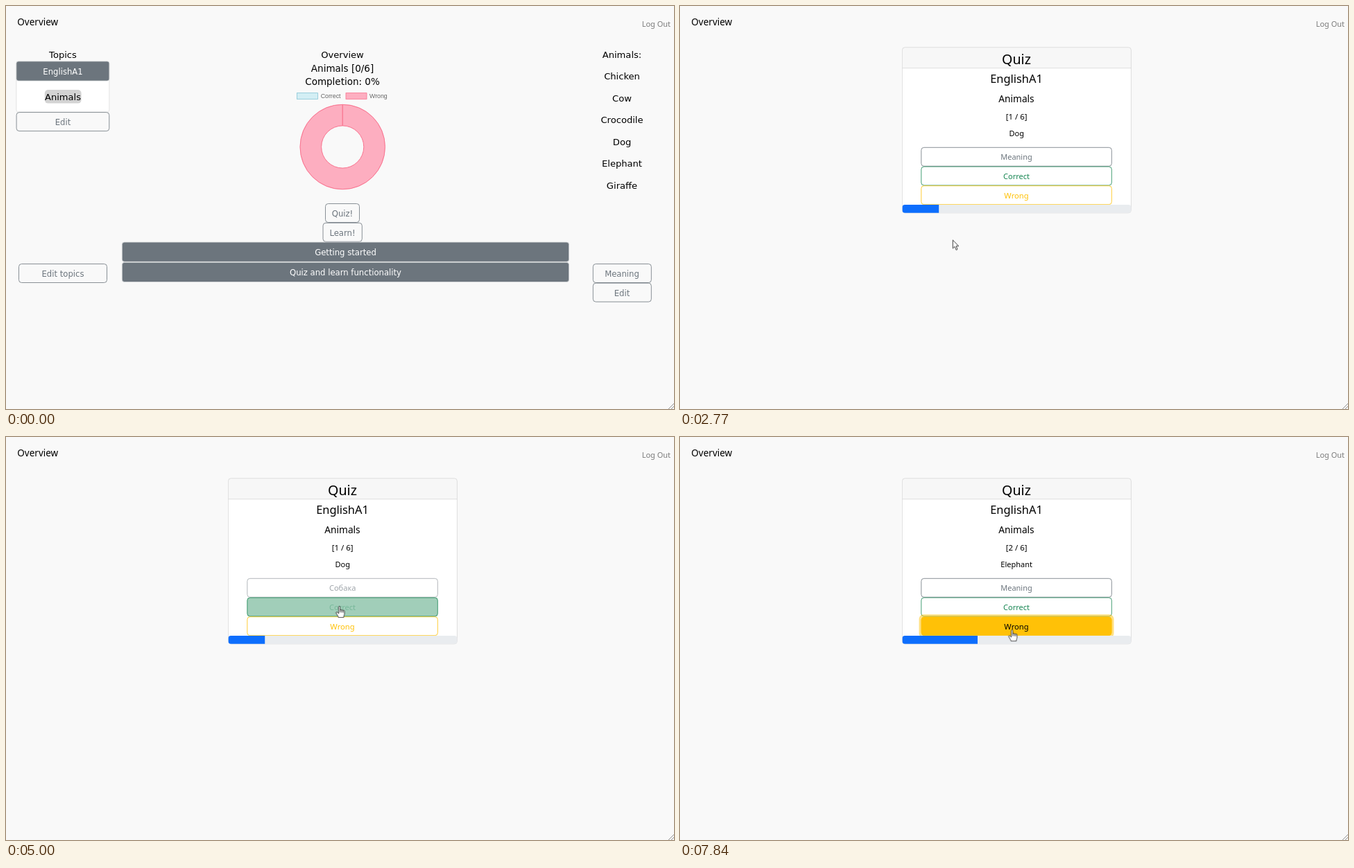
Recreate the animation shown at these times as an HTML page. Size 963x582 px, loop 8 s.

```html
<!DOCTYPE html>
<html lang="en">
<head>
<meta charset="utf-8">
<title>Vocabulary quiz</title>
<style>
@property --h { syntax: "<number>"; inherits: true; initial-value: 0; }
@property --r { syntax: "<number>"; inherits: true; initial-value: 0; }

html, body { margin: 0; width: 100%; height: 100%; overflow: hidden; background: #f9f9f9; }
svg { display: block; width: 100vw; height: 100vh; }
text { text-anchor: middle; font: 11px "Noto Sans", sans-serif; }
.left { text-anchor: start; }
#home text { font: 13.1px "DejaVu Sans", sans-serif; }
#home .wide { font-size: 13.5px; }
#home .legend { font: 8.8px "Liberation Sans", Arial, sans-serif; fill: #666; }
#home .btn text, #home .bar text { font-size: 11.65px; }

/* --h: hover amount, --r: focus ring amount */
.btn { --c: #6c757d; --on: #fff; }
.ok { --c: #198754; }
.warn { --c: #ffc107; --on: #000; }
.btn rect { fill: var(--c); fill-opacity: var(--h); stroke: var(--c); stroke-width: .8; }
.btn .ring { fill: none; stroke-width: 2.9; stroke-opacity: calc(var(--r) * .5); }
.btn text { fill: color-mix(in srgb, var(--on) calc(var(--h) * 100%), var(--c)); }
.bar rect { fill: #6c757d; stroke: #d3d6d8; stroke-width: .8; }
.bar text { fill: #fff; }

#home, #quiz, .first, .second, .ask, .answer, #arrow, #hand { animation: 8s step-end infinite; }
#home, .first, .ask { opacity: 1; }
#home { animation-name: home; }
#quiz { animation-name: quiz; }
.first { animation-name: first; }
.second { animation-name: second; }
.ask { animation-name: ask; }
.answer { animation-name: answer; }
#arrow { animation-name: arrow; }
#hand { animation-name: hand; }
#start { animation: start 8s ease-in-out infinite; }
#bar1 { animation: bar1 8s ease-in-out infinite; }
#bar2 { animation: bar2 8s ease-in-out infinite; }
#meaning { animation: meaning 8s ease-in-out infinite; }
#correct { animation: correct 8s ease-in-out infinite; }
#wrong { animation: wrong 8s ease-in-out infinite; }
#progress { animation: progress 8s ease infinite; }
#cursor { animation: move 8s linear infinite; }

@keyframes home { 0% { opacity: 1 } 23.75%, 100% { opacity: 0 } }
@keyframes quiz { 0% { opacity: 0 } 23.75%, 100% { opacity: 1 } }
@keyframes first { 0% { opacity: 1 } 71.375%, 100% { opacity: 0 } }
@keyframes second { 0% { opacity: 0 } 71.375%, 100% { opacity: 1 } }
@keyframes ask { 0% { opacity: 1 } 51.75% { opacity: 0 } 71.375%, 100% { opacity: 1 } }
@keyframes answer { 0% { opacity: 0 } 51.75% { opacity: 1 } 71.375%, 100% { opacity: 0 } }

@keyframes start {
  0%, 8.375% { --h: 0 } 10.25%, 100% { --h: 1 }
  0%, 14.75% { --r: 0 } 17.1%, 100% { --r: 1 }
}
@keyframes bar2 { 0%, 4.75%, 7.375%, 100% { fill: #6c757d } 5.5% { fill: #666e75 } }
@keyframes bar1 { 0%, 5.5%, 8.25%, 100% { fill: #6c757d } 6.375% { fill: #646c73 } }
@keyframes meaning {
  0%, 39.72% { --h: 0 } 41.6%, 51.74% { --h: 1 } 51.75%, 100% { --h: 0 }
  0%, 45% { --r: 0 } 46.9%, 51.74% { --r: 1 } 51.75%, 100% { --r: 0 }
  0%, 51.74% { opacity: 1 } 51.75%, 71.37% { opacity: .65 } 71.375%, 100% { opacity: 1 }
}
@keyframes correct {
  0%, 37.75% { --h: 0 } 39.72% { --h: 1 } 41.6%, 61.675% { --h: 0 }
  63.55%, 93.5% { --h: 1 } 95.375%, 100% { --h: 0 }
  0%, 64.625% { --r: 0 } 66.5%, 71.375% { --r: 1 } 73.25%, 100% { --r: 0 }
}
@keyframes wrong {
  0%, 36.5% { --h: 0 } 37.75% { --h: .7 } 39.4%, 93.5% { --h: 0 } 95.375%, 100% { --h: 1 }
  0%, 96.125% { --r: 0 } 97.94%, 100% { --r: 1 }
}
@keyframes progress { 0%, 71.375% { width: 52.8px } 74.375%, 100% { width: 108.6px } }

@keyframes move {
  0%, .375% { transform: translate(941px, 574px) }
  4.75% { transform: translate(653px, 402px) }
  5.5% { transform: translate(606px, 371px) }
  6.375% { transform: translate(558px, 341px) }
  8% { transform: translate(510px, 312px) }
  9.5%, 19% { transform: translate(485px, 298px) }
  19.875% { transform: translate(459px, 309px) }
  21.75% { transform: translate(419.5px, 328.5px) }
  23.75% { transform: translate(400px, 336px) }
  25.375%, 34.625% { transform: translate(392.7px, 338px) }
  36.5% { transform: translate(433px, 287px) }
  37.75% { transform: translate(460px, 258px) }
  39.7% { transform: translate(483px, 231px) }
  40.125% { transform: translate(485px, 221.5px) }
  41.25%, 60.25% { transform: translate(485px, 222px) }
  61.6% { transform: translate(482px, 232px) }
  62.5% { transform: translate(480.7px, 244px) }
  63.25%, 90% { transform: translate(480.4px, 248.7px) }
  90.375%, 92.875% { transform: translate(480.4px, 252.5px) }
  93.5% { transform: translate(480px, 259.5px) }
  95%, 100% { transform: translate(478.7px, 278.2px) }
}
@keyframes arrow {
  0% { opacity: 0 } .375% { opacity: 1 } 4.75% { opacity: 0 } 6.375% { opacity: 1 } 8% { opacity: 0 }
  19.875% { opacity: 1 } 36.5% { opacity: 0 } 51.75% { opacity: 1 } 61.6%, 100% { opacity: 0 }
}
@keyframes hand {
  0% { opacity: 0 } 4.75% { opacity: 1 } 6.375% { opacity: 0 } 8% { opacity: 1 }
  19.875% { opacity: 0 } 36.5% { opacity: 1 } 51.75% { opacity: 0 } 61.6%, 100% { opacity: 1 }
}
</style>
</head>
<body>
<svg viewBox="0 0 963 582">
  <defs>
    <clipPath id="track"><rect x="320.4" y="287" width="330" height="11.8" rx="4"/></clipPath>
  </defs>

  <text class="left" x="16.3" y="28" style="font-size:13.5px">Overview</text>
  <text class="left" x="916.7" y="29.6" fill="#7c7c7c">Log Out</text>
  <path d="M955 582l8-8M959 582l4-4" stroke="#777" stroke-width=".8"/>

  <g id="home">
    <text x="82" y="74.8">Topics</text>
    <rect x="14.9" y="80" width="134" height="73" rx="3" fill="#fff" stroke="#dcdcdc" stroke-width=".8"/>
    <g class="bar">
      <rect x="14.9" y="79.9" width="134" height="28.2" rx="3"/>
      <text x="82" y="98.5">EnglishA1</text>
    </g>
    <rect x="55.8" y="121" width="52.8" height="19.6" rx="5" fill="#d3d3d3"/>
    <text x="82" y="136.2">Animals</text>
    <g class="btn">
      <rect x="15.1" y="153.6" width="133.7" height="27" rx="4"/>
      <text x="82" y="171.8">Edit</text>
    </g>
    <g class="btn">
      <rect x="18.5" y="372.5" width="127" height="27" rx="4"/>
      <text x="82" y="390.8">Edit topics</text>
    </g>

    <text x="485" y="74.8">Overview</text>
    <text x="485" y="94.5" class="wide">Animals [0/6]</text>
    <text x="485" y="114.2" class="wide">Completion: 0%</text>
    <rect x="419.5" y="125.6" width="30" height="8.8" fill="#d3eef4" stroke="#87c5d5" stroke-width=".8"/>
    <text class="legend left" style="text-anchor:start" x="453.7" y="132.6">Correct</text>
    <rect x="490" y="125.6" width="30" height="8.8" fill="#fdaec0" stroke="#f8748f" stroke-width=".8"/>
    <text class="legend left" style="text-anchor:start" x="524" y="132.6">Wrong</text>
    <circle cx="485.2" cy="203.5" r="46" fill="none" stroke="#fdaec0" stroke-width="31"/>
    <g fill="none" stroke="#f8748f">
      <circle cx="485.2" cy="203.5" r="61.2"/>
      <circle cx="485.2" cy="203.5" r="30.6"/>
      <path d="M485.2 142.3v30.6" stroke-width="1.3"/>
    </g>

    <g class="btn" id="start">
      <rect class="ring" x="458.7" y="283.6" width="52.6" height="30.8" rx="5"/>
      <rect x="460.5" y="285.5" width="49" height="27" rx="4"/>
      <text x="485" y="303.8">Quiz!</text>
    </g>
    <g class="btn">
      <rect x="457" y="313.3" width="56.3" height="27" rx="4"/>
      <text x="485" y="331.6">Learn!</text>
    </g>
    <g class="bar">
      <rect id="bar1" x="167.3" y="341.1" width="644.3" height="28.2" rx="3.5"/>
      <rect id="bar2" x="167.3" y="370.3" width="644.3" height="28.2" rx="3.5"/>
      <text x="489.5" y="360">Getting started</text>
      <text x="489.5" y="389.2">Quiz and learn functionality</text>
    </g>

    <text x="888" y="74.8">Animals:</text>
    <text x="888" y="106.2">Chicken</text>
    <text x="888" y="137.7">Cow</text>
    <text x="888" y="169.2">Crocodile</text>
    <text x="888" y="200.7">Dog</text>
    <text x="888" y="232.2">Elephant</text>
    <text x="888" y="263.7">Giraffe</text>
    <g class="btn">
      <rect x="846.3" y="372.5" width="84" height="27" rx="4"/>
      <text x="888" y="390.8">Meaning</text>
    </g>
    <g class="btn">
      <rect x="846.3" y="400.2" width="84" height="27" rx="4"/>
      <text x="888" y="418.5">Edit</text>
    </g>
  </g>

  <g id="quiz">
    <rect x="320.4" y="59.7" width="330" height="239.1" rx="4" fill="#fff"/>
    <path d="M320.4 89.7V63.7a4 4 0 0 1 4-4h322a4 4 0 0 1 4 4v26z" fill="#f7f7f7"/>
    <path d="M320.4 89.7h330" stroke="#d6d6d6" stroke-width=".8"/>
    <rect x="320.4" y="59.7" width="330" height="239.1" rx="4" fill="none" stroke="#d6d6d6" stroke-width=".8"/>
    <text x="485" y="83.5" style="font-size:19.7px">Quiz</text>
    <text x="485" y="110.6" style="font-size:16.4px">EnglishA1</text>
    <text x="485" y="139" style="font-size:13.7px">Animals</text>
    <g class="first">
      <text x="485.2" y="164" style="font-size:11.4px">[1 / 6]</text>
      <text x="485.2" y="188.3">Dog</text>
    </g>
    <g class="second">
      <text x="485.2" y="164" style="font-size:11.4px">[2 / 6]</text>
      <text x="485.2" y="188.3">Elephant</text>
    </g>

    <g class="btn" id="meaning">
      <rect class="ring" x="346" y="202.4" width="278" height="30.8" rx="5"/>
      <rect x="347.8" y="204.3" width="274.5" height="27" rx="4"/>
      <text class="ask" x="485" y="222.4">Meaning</text>
      <text class="answer" x="485.2" y="222.4">Собака</text>
    </g>
    <g class="btn ok" id="correct">
      <rect class="ring" x="346" y="230.1" width="278" height="30.8" rx="5"/>
      <rect x="347.8" y="232" width="274.5" height="27" rx="4"/>
      <text x="485" y="250.2">Correct</text>
    </g>
    <g class="btn warn" id="wrong">
      <rect class="ring" x="346" y="257.8" width="278" height="30.8" rx="5"/>
      <rect x="347.8" y="259.7" width="274.5" height="27" rx="4"/>
      <text x="485" y="278" style="font-size:11.2px">Wrong</text>
    </g>

    <g clip-path="url(#track)">
      <rect x="320" y="287" width="331" height="12" fill="#e9ecef"/>
      <rect id="progress" x="320.4" y="287" width="52.8" height="12" fill="#0d6efd"/>
    </g>
  </g>

  <g id="cursor" fill="#fff" stroke="#111" stroke-width=".8" stroke-linejoin="round">
    <path id="arrow" d="M.3.3V12.3L3 9.7 5.1 14.6 7 13.7 5 9H8.7z"/>
    <path id="hand" d="M-1.2 1.4a1.1 1.1 0 0 1 2.2 0V6.2a1.1 1 0 0 1 2.2.2 1.1 1 0 0 1 2.1.5 1 1 0 0 1 1.9.7V11c0 2-1.2 3-1.2 5.6H-1.5C-2 14-4.5 11.6-4.9 9.8c-.2-1.2 1.3-1.6 2.2-.6L-1.2 11zM1 6.2v3M3.2 6.4v3M5.3 6.9v2.6"/>
  </g>
</svg>
</body>
</html>
```
